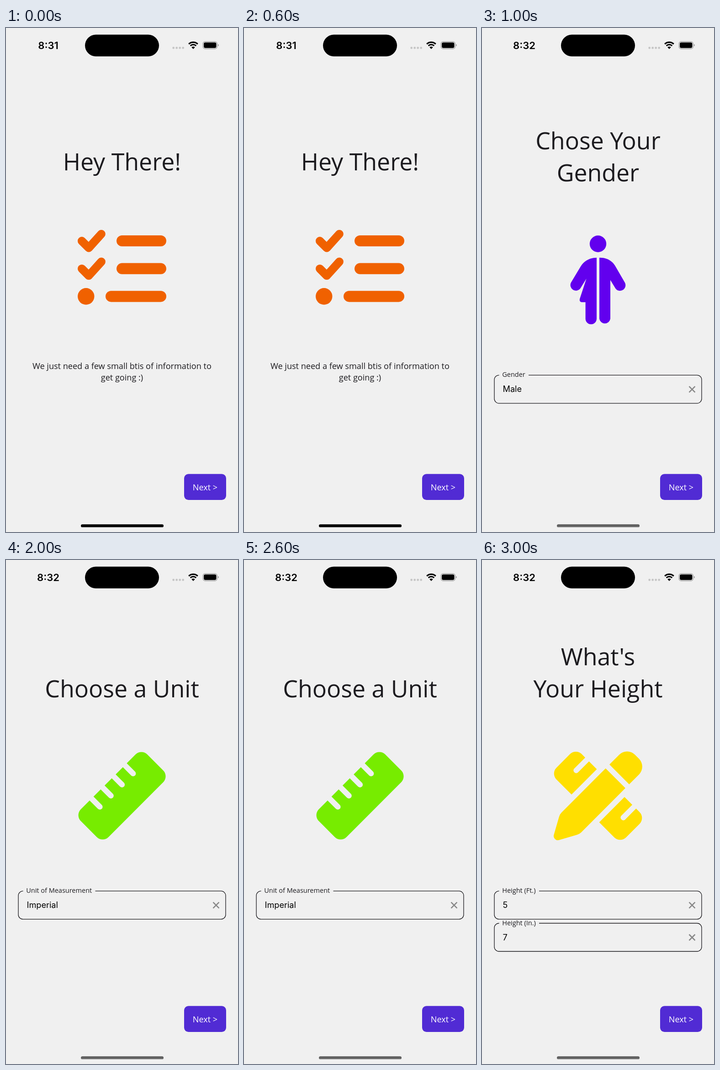
Animation of 508 by 1101 pixels, one loop 4000 ms. Source, as an HTML page:

```html
<!DOCTYPE html>
<html lang="en">
<head>
<meta charset="utf-8">
<title>Onboarding</title>
<style>
  html, body { margin: 0; width: 100%; height: 100%; overflow: hidden; background: #f0f0f0; }
  svg { display: block; width: 100%; height: 100%; }
  text { font-family: "Open Sans", sans-serif; font-size: 18.1px; fill: #1c1b1f; }
  .title { font-size: 51.8px; text-anchor: middle; }
  .body, .button { text-anchor: middle; }
  .button { fill: #fff; }
  .label { font-size: 14.5px; }
  .value { font-family: Inter, sans-serif; fill: #000; }
  .clock { font: 600 22px Inter, sans-serif; fill: #000; text-anchor: middle; }
  .outline { fill: none; stroke: #1c1b1f; stroke-width: 1.3; }
  .clear { fill: none; stroke: #888; stroke-width: 2.6; }
</style>
</head>
<body>
<svg viewBox="0 0 508 1101">
  <defs>
    <linearGradient id="fade" x2="0" y2="1">
      <stop stop-color="#555"/><stop offset="1" stop-color="#707070"/>
    </linearGradient>
  </defs>
  <rect width="508" height="1101" fill="#f0f0f0"/>

  <text class="clock" id="clock" x="92.5" y="46"></text>
  <rect x="173" y="14.5" width="162" height="47.5" rx="23.75"/>
  <path d="M366.7 43.4h21.1" stroke="#c5c5c5" stroke-width="4.8" stroke-linecap="round" stroke-dasharray="0 7"/>
  <g fill="none" stroke="#000">
    <path d="M400.2 35A14.4 14.4 0 0 1 419.8 35" stroke-width="3.2"/>
    <path d="M403.7 38.8A9.2 9.2 0 0 1 416.3 38.8" stroke-width="3"/>
    <path d="M410 46L406.2 41.9A5.5 5.5 0 0 1 413.8 41.9Z" fill="#000" stroke="none"/>
  </g>
  <rect x="431.1" y="29.6" width="31.3" height="16" rx="5" fill="none" stroke="#999" stroke-width="1.2"/>
  <rect x="433" y="31.5" width="27.5" height="12.2" rx="3.4"/>
  <path d="M464 35q2 .8 2 2.6t-2 2.6z" fill="#999"/>

  <g id="screen"></g>

  <rect x="390" y="974.3" width="92" height="56.8" rx="9.5" fill="#512bd4"/>
  <text class="button" x="436" y="1009.5">Next &gt;</text>
  <rect id="home" x="164" y="1084.2" width="181" height="6.4" rx="3.2"/>
</svg>

<script>
const title = (text, y) => `<text class="title" x="254" y="${y}">${text}</text>`;
const body = (text, y) => `<text class="body" x="254" y="${y}">${text}</text>`;
const bar = (x, y) => `<rect x="${x}" y="${y}" width="${351 - x}" height="24.2" rx="12.1"/>`;
const check = y => `<path d="M166 ${y}l15.2 15.2 27.5-30.4" fill="none"
  stroke="#f06100" stroke-width="18.2" stroke-linecap="round" stroke-linejoin="round"/>`;

// Outlined box whose top edge breaks off for the label.
const field = (label, value, y, gapEnd) => `<g transform="translate(0 ${y})">
  <path class="outline" d="M${gapEnd} 0H471a10 10 0 0 1 10 10V51.5a10 10 0 0 1-10 10H37a10 10 0 0 1-10-10V10A10 10 0 0 1 37.5 0"/>
  <text class="label" x="44.2" y="4">${label}</text>
  <text class="value" x="45.6" y="37">${value}</text>
  <path class="clear" d="M453.5 24.5l13 13m0-13l-13 13"/></g>`;

// Icons on a 512-unit grid.
const icon = (fill, shapes) =>
  `<g transform="translate(157 418) scale(.379)" fill="${fill}">${shapes}</g>`;

const checklist = `<g fill="#f06100">${check(465.2)}${check(525.8)}
  ${bar(242, 452.9)}${bar(242, 513.6)}${bar(218, 574.2)}
  <circle cx="175.2" cy="586.3" r="18.2"/></g>`;

const person = `<g fill="#6200ee"><circle cx="254" cy="471.5" r="18.2"/>
  <path d="M257 501.7h2C273 501.7 285 508.5 291.5 519.5L313 556.5A12.1 12.1 0 0 1 292.3 568.9L281 550.4V635A12.1 12.1 0 0 1 257 635Z"/>
  <path d="M251 501.7C237 501.7 224 508 216 521L194.8 556.3A12.1 12.1 0 0 0 215.4 568.8L228.6 547.5 214.3 591Q212 599 219.5 599H226.6V635A12.1 12.1 0 0 0 251 635Z"/></g>`;

const notches = [-135.8, -45.3, 45.3, 135.8].map(x => `M${x}-135V-45.2`).join("");
const ruler = icon("#77ec00", `<g transform="translate(256 256) rotate(-45)">
  <rect x="-271.5" y="-113.1" width="543" height="226.3" rx="48"/>
  <path d="${notches}" stroke="#f0f0f0" stroke-width="32" stroke-linecap="round"/></g>`);

const rulerEnd = `<path d="M249 103L103 249 16 162a48 48 0 0 1 0-68L94 16a48 48 0 0 1 68 0l20 20-65 65a16 16 0 0 0 22 22l65-65Z"/>`;
const rulerTail = `<path d="M409 263l45 45-65 65a16 16 0 0 0 22 22l65-65 20 20a48 48 0 0 1 0 68L418 496a48 48 0 0 1-68 0l-87-87Z"/>`;
const pencilAndRuler = icon("#ffdf00", `${rulerEnd}${rulerTail}
  <path d="M469 19l24 24a64 64 0 0 1 0 90l-57 57L322 76l57-57a64 64 0 0 1 90 0Z"/>
  <path d="M45 353L300 98 414 212 159 467q-10 10-24 14L31 511A24 24 0 0 1 1 481L31 377q4-14 14-24Z"/>`);

const screens = [
  title("Hey There!", 310.5) + checklist +
    body("We just need a few small btis of information to", 745.3) + body("get going :)", 769.9),
  title("Chose Your", 265) + title("Gender", 335.4) + person + field("Gender", "Male", 758.3, 102),
  title("Choose a Unit", 300.2) + ruler + field("Unit of Measurement", "Imperial", 723.2, 195.5),
  title("What's", 230) + title("Your Height", 300.4) + pencilAndRuler +
    field("Height (Ft.)", "5", 723.2, 125) + field("Height (In.)", "7", 793.5, 125)
];

const byId = id => document.getElementById(id);
let shown = -1;

function draw() {
  const current = Math.floor(performance.now() / 1000) % screens.length;
  if (current !== shown) {
    shown = current;
    byId("screen").innerHTML = screens[current];
    byId("clock").textContent = current ? "8:32" : "8:31";
    byId("home").setAttribute("fill", current ? "url(#fade)" : "#000");
  }
  requestAnimationFrame(draw);
}
draw();
</script>
</body>
</html>
```
